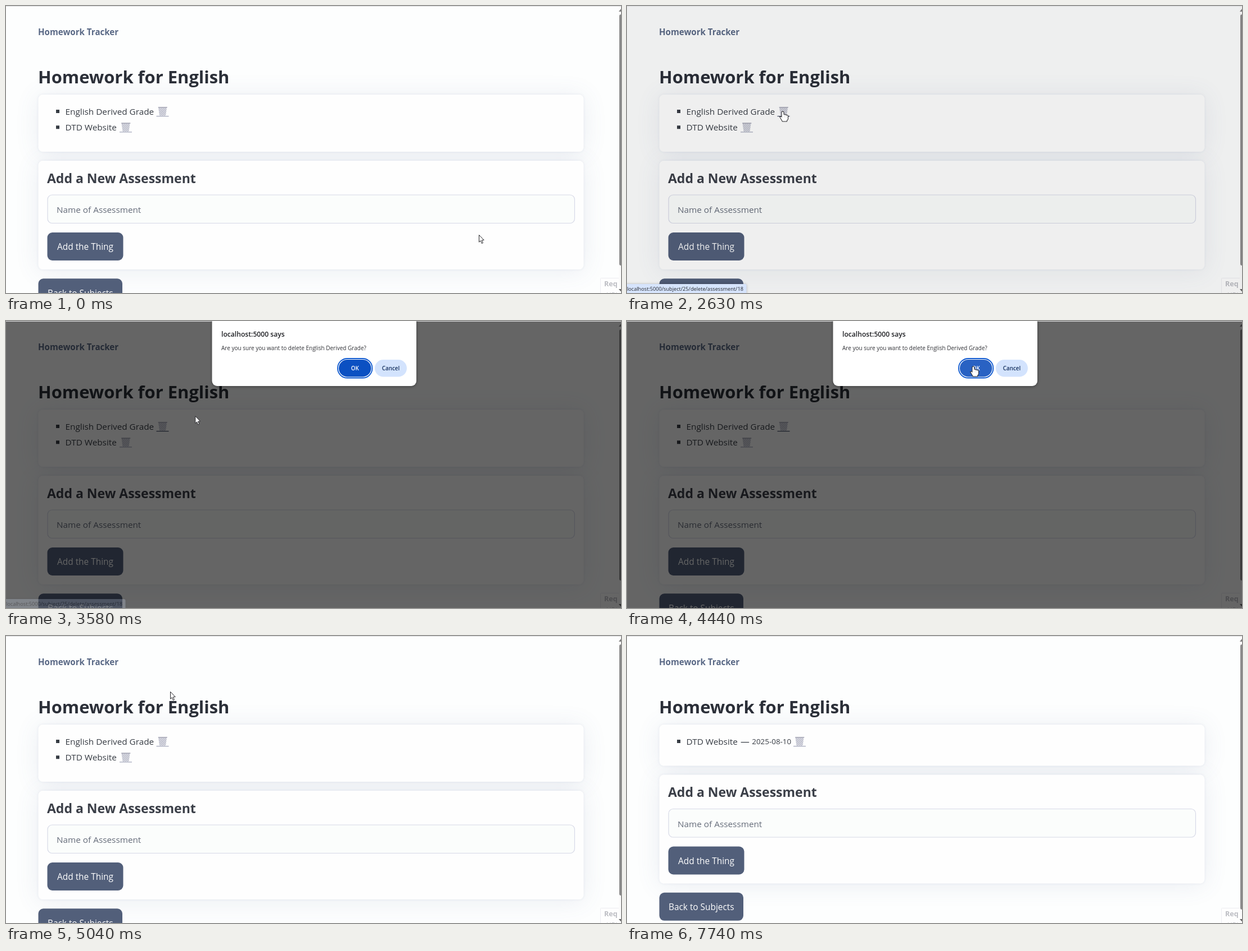
Recreate the animation shown at these times as an HTML page with a canvas. Size 1094 px wide and 512 px high, loop 8600 ms.

```html
<!DOCTYPE html>
<html lang="en">
<head>
<meta charset="utf-8">
<title>Homework Tracker</title>
<style>
html, body { margin: 0; width: 100%; height: 100%; overflow: hidden; background: #fdfefe; }
canvas { display: block; }
</style>
</head>
<body>
<canvas id="stage" width="1094" height="512"></canvas>
<script>
const W = 1094, H = 512, LOOP = 8600;
const FONT = '"Open Sans", "Noto Sans", sans-serif';
const INK = '#373c44', SLATE = '#525f7a', RULE = '#dcdcde';

// key moments in ms
const HOVER = 1780, OPEN = 2620, AIM = 3360, CLOSE = 4480, RELOAD = 6030, LEAVE = 7740;

// pointer sweeps: start, end, destination; it rests in between
const START = { x: 841, y: 408 };
const SWEEPS = [
  [30, 320, 567, 311],
  [550, 1400, 140, 186],
  [1430, 1860, 279, 186],
  [1960, 2230, 277, 188],
  [AIM, 4190, 616, 81],
  [CLOSE, 5040, 292, 99],
  [5410, 5810, 206, 133],
  [6250, 6380, 106, 113],
  [6380, 6660, 478, 392],
  [6660, 6920, 194, 216],
  [7140, LEAVE, 998, 472]
];

const stage = document.getElementById('stage').getContext('2d');
const layer = new OffscreenCanvas(W, H).getContext('2d');
let ctx = stage;
let areas = [];

const ramp = (t, a, b) => Math.max(0, Math.min(1, (t - a) / (b - a)));
const ease = p => p * p * (3 - 2 * p);

function pointerAt(t) {
  const p = { ...START };
  for (const [from, to, x, y] of SWEEPS) {
    const k = ease(ramp(t, from, to));
    p.x += (x - p.x) * k;
    p.y += (y - p.y) * k;
  }
  return p;
}

function addArea(kind, x, y, w, h) {
  const m = ctx.getTransform();
  areas.push({ kind, x: x + m.e, y: y + m.f, w, h });
}

function areaAt(p) {
  return areas.find(a => p.x >= a.x && p.x <= a.x + a.w && p.y >= a.y && p.y <= a.y + a.h);
}

function at(x, y, draw) {
  ctx.save();
  ctx.translate(x, y);
  draw();
  ctx.restore();
}

function shadowed(color, blur, dy, draw) {
  ctx.save();
  ctx.shadowColor = color;
  ctx.shadowBlur = blur;
  ctx.shadowOffsetY = dy;
  draw();
  ctx.restore();
}

// draws a group with one common opacity
function faded(alpha, draw) {
  if (alpha <= 0) return;
  layer.clearRect(0, 0, W, H);
  ctx = layer;
  draw();
  ctx = stage;
  ctx.globalAlpha = alpha;
  ctx.drawImage(layer.canvas, 0, 0);
  ctx.globalAlpha = 1;
}

function text(str, x, y, size, color, weight = 400, align = 'left') {
  ctx.font = `${weight} ${size}px ${FONT}`;
  ctx.textAlign = align;
  ctx.fillStyle = color;
  ctx.fillText(str, x, y);
}

function copy(str, x, y, size, color, weight) {
  text(str, x, y, size, color, weight);
  addArea('beam', x, y - size, ctx.measureText(str).width, size * 1.3);
}

function paint(fill, stroke, line = 1) {
  if (fill) { ctx.fillStyle = fill; ctx.fill(); }
  if (stroke) { ctx.strokeStyle = stroke; ctx.lineWidth = line; ctx.stroke(); }
}

function box(x, y, w, h, r, ...style) {
  ctx.beginPath();
  ctx.roundRect(x, y, w, h, r);
  paint(...style);
}

function poly(points, ...style) {
  ctx.beginPath();
  points.forEach(([x, y]) => ctx.lineTo(x, y));
  ctx.closePath();
  paint(...style);
}

function card(y, h, blur, dy) {
  shadowed('rgba(84,96,150,0.11)', blur, dy, () => box(57.5, y, 970, h, 8, '#fefefe'));
}

// basket with mesh, sitting on its link underline
function trash(x, y, hover) {
  at(x, y, () => {
    poly([[3.5, 2], [18.5, 2], [16.5, 16.5], [5.5, 16.5]], '#dddee6');
    ctx.save();
    ctx.clip();
    ctx.beginPath();
    for (let i = -16; i < 36; i += 3.5) {
      ctx.moveTo(i, 0); ctx.lineTo(i + 18, 18);
      ctx.moveTo(i, 18); ctx.lineTo(i + 18, 0);
    }
    paint(null, '#a5a6b5', 0.6);
    ctx.restore();
    box(3, 1, 16.5, 1.6, 0.8, '#a9aab8');
    ctx.fillStyle = hover ? '#454d66' : '#a2a6ba';
    ctx.fillRect(0, 17, 22, 1.2);
    addArea('hand', 0, 0, 22, 18);
  });
}

function item(label, y) {
  ctx.fillStyle = INK;
  ctx.fillRect(89, y - 8.5, 6, 6);
  copy(label, 105.5, y, 15.3, INK);
}

function button(label, x, y, w) {
  box(x, y, w, 50, 9, SLATE);
  text(label, x + w / 2, y + 31.3, 15.4, '#fff', 400, 'center');
  addArea('hand', x, y, w, 50);
}

function scrollbar(bottom) {
  ctx.fillStyle = '#fbfbfb';
  ctx.fillRect(1090, 1, 4, H);
  box(1091, 15, 6, bottom - 15, 3, '#8a8a8a');
  poly([[1090, 10], [1094.5, 4.5], [1099, 10]], '#7d7d7d');
  poly([[1090, 505], [1094.5, 510], [1099, 505]], '#5e5e5e');
}

function page(done, hover) {
  const dy = done ? -28.5 : 0;
  ctx.fillStyle = '#fdfefe';
  ctx.fillRect(0, 0, W, H);

  for (const [blur, drop] of [[44, 3], [4, 0]]) {
    card(158, 102 + dy, blur, drop);
    card(276 + dy, 194, blur, drop);
  }

  copy('Homework Tracker', 57, 52, 15.12, '#5a6986', 700);
  copy('Homework for English', 57, 138, 30.92, '#2b2f38', 700);

  if (done) {
    item('DTD Website', 193.5);
    text('—', 202, 193.5, 15.8, INK);
    copy('2025-08-10', 222.3, 193.3, 13.4, INK);
    trash(296, 179, false);
  } else {
    item('English Derived Grade', 193.5);
    trash(267.5, 179, hover);
    item('DTD Website', 221.8);
    trash(202, 207.3, false);
  }

  at(0, dy, () => {
    copy('Add a New Assessment', 73, 315.5, 23, '#3b3f48', 700);
    box(74, 337, 937.5, 50.5, 8, '#fbfdfc', '#d7d9e7', 1.2);
    addArea('beam', 74, 337, 937, 50);
    text('Name of Assessment', 90, 369, 15.3, '#646b79');
    button('Add the Thing', 73.5, 404, 135);
    button('Back to Subjects', 57.5, 486.3, 149.5);
  });

  box(1057.5, 485.5, 50, 40, 1, '#fefefe', '#ededf1');
  text('Req', 1064, 500, 12.6, '#bcbdc3', 700);
  text('URL', 1068, 520, 12, '#c4c5ca');
  scrollbar(done ? 488 : 463);
  ctx.fillStyle = RULE;
  ctx.fillRect(0, 0, W, 1);
}

function status() {
  shadowed('rgba(0,0,0,0.25)', 4, 0, () => box(-4, 496, 216.5, 20, [0, 3, 0, 0], '#d6e4fc'));
  text('localhost:5000/subject/25/delete/assessment/18', 0, 508, 9.17, '#24272e');
}

function dialogButton(label, x, w, fill, color, live) {
  box(x, 69, w, 30.5, 15.2, fill);
  text(label, x + w / 2, 88, 9.9, color, 600, 'center');
  if (live) addArea('hand', x, 69, w, 30.5);
}

function dialog(live, over) {
  shadowed('rgba(0,0,0,0.4)', 5, 1, () => box(366.5, -30, 363.5, 146, 9, '#fff'));
  text('localhost:5000 says', 383, 28, 12.15, '#1f2024', 600);
  text('Are you sure you want to delete English Derived Grade?', 383, 51.7, 10, '#303136');
  if (live) box(590, 67, 61.5, 34.5, 17, null, '#0b57d0', 1.8);
  dialogButton('OK', 592, 57.5, over ? '#2962c3' : '#0b50c2', '#fff', live);
  dialogButton('Cancel', 656, 57, '#d3e3fd', '#16315f', live);
}

const cursors = {
  arrow() {
    poly([[0.5, 0.5], [0.5, 13.2], [3.3, 10.7], [5.3, 15.6], [7.4, 14.7], [5.3, 9.9], [9.2, 9.6]],
      '#fff', '#26262a');
  },
  beam() {
    ctx.beginPath();
    ctx.moveTo(0, -6.5);
    ctx.lineTo(0, 6.5);
    for (const y of [-6.5, 6.5]) { ctx.moveTo(-2.5, y); ctx.lineTo(2.5, y); }
    paint(null, '#4b4b50');
  },
  // outlines first, then fills, so that the parts join into one shape
  hand() {
    for (const style of [[null, '#26262a', 2], ['#fff']]) {
      box(-1.5, 0.5, 3, 13, 1.5, ...style);
      for (let i = 0; i < 3; i++) box(1 + i * 2.6, 5.6 + i * 0.7, 2.8, 8, 1.4, ...style);
      poly([[-4.6, 10], [-3, 9.6], [-1, 11.5], [9, 10], [7.5, 15.5], [7, 17.5], [-0.3, 17.5]], ...style);
    }
  }
};

function render(t) {
  const pointer = pointerAt(t);
  const modal = t >= OPEN && t < CLOSE;
  const closing = ramp(t, CLOSE, CLOSE + 160);
  const shown = ramp(t, OPEN + 100, OPEN + 270);

  areas = [];
  page(t >= RELOAD, t >= HOVER && t < CLOSE + 100);
  if (modal) {
    ctx.fillStyle = `rgba(0,0,0,${0.6 * ramp(t, OPEN, OPEN + 110)})`;
    ctx.fillRect(0, 1, W, H);
    if (t >= AIM) areas = [];
  }

  faded(Math.min(ramp(t, HOVER, HOVER + 140), 1 - ramp(t, AIM + 100, AIM + 260)), status);

  const lift = modal ? 16 * (1 - shown) : 4 + 12 * closing;
  const overOk = modal && t > AIM && pointer.x > 592 && pointer.y < 100;
  faded(modal ? shown : t >= CLOSE ? 1 - closing : 0,
    () => at(0, -lift, () => dialog(modal, overOk)));

  if (t < LEAVE) {
    const hit = areaAt(pointer);
    at(pointer.x, pointer.y, cursors[hit ? hit.kind : 'arrow']);
  }
}

const start = performance.now();
function tick() {
  render((performance.now() - start) % LOOP);
  requestAnimationFrame(tick);
}
tick();
</script>
</body>
</html>
```
